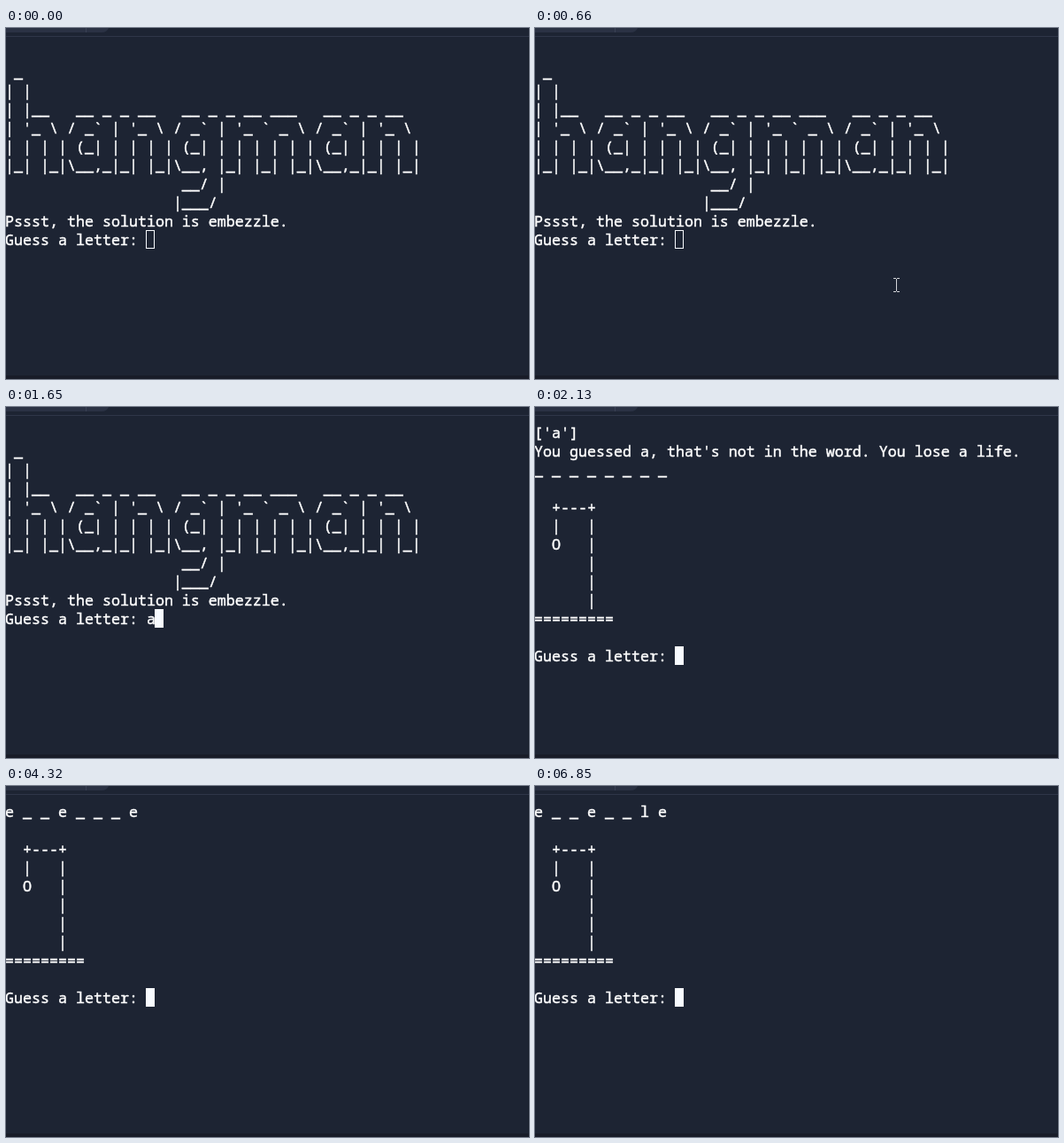
An HTML page that plays this animation: 591 px wide and 396 px high, repeating every 7.99 s.

```html
<!DOCTYPE html>
<html lang="en">
<head>
<meta charset="utf-8">
<title>Hangman terminal</title>
<style>
  html, body { margin: 0; width: 100%; height: 100%; overflow: hidden; background: #1d2433; }
  svg { display: block; width: 591px; height: 396px; }
  text {
    font: 16.667px "Noto Sans Mono", "DejaVu Sans Mono", monospace;
    font-variant-ligatures: none;
    white-space: pre;
    fill: #fff;
    stroke: #fff;
    stroke-width: .45px;
  }
</style>
</head>
<body>
<svg viewBox="0 0 591 396">
  <rect width="591" height="396" fill="#1d2433"/>
  <path d="M0 0H116Q114 5 108 5H0Z" fill="#2b3244"/>
  <path d="M90.5 0V5" stroke="#3a4155"/>
  <path d="M0 9.5H591" stroke="#2f3648"/>
  <path d="M590.5 10V392" stroke="#191f2c"/>
  <rect y="392" width="591" height="4" fill="#181c28"/>
  <g id="lines"></g>
  <rect id="caret" stroke="#f8fbff" width="9" height="20"/>
  <path id="mouse" d="M-3 -7.5H0M1 -7.5H4M-3 7.5H0M1 7.5H4M.5 -7V7" fill="none" stroke="#d4d6da"/>
</svg>
<script>
const LOOP = 7990, COL = 10, ROW = 21, LEFT = -2, TOP = 18, BASE = 17;
const $ = id => document.getElementById(id);
const PROMPT = "Guess a letter: ";

const title = String.raw`
 _
| |
| |__   __ _ _ __   __ _ _ __ ___   __ _ _ __
| '_ \ / _${"`"} | '_ \ / _${"`"} | '_ ${"`"} _ \ / _${"`"} | '_ \
| | | | (_| | | | | (_| | | | | | | (_| | | | |
|_| |_|\__,_|_| |_|\__, |_| |_| |_|\__,_|_| |_|
                    __/ |
                   |___/
Pssst, the solution is embezzle.`.split("\n");

const gallows = ["", "  +---+", "  |   |", "  O   |", "      |", "      |", "      |", "=========", ""];
const miss = ["['a']", "You guessed a, that's not in the word. You lose a life.", "_ _ _ _ _ _ _ _", ...gallows];

// start time, lines above the prompt, typed letter
const states = [
  [0, title, ""],
  [1650, title, "a"],
  [2130, miss, ""],
  [3650, miss, "e"],
  [4320, ["e _ _ e _ _ _ e", ...gallows], ""],
  [6580, ["e _ _ e _ _ _ e", ...gallows], "l"],
  [6850, ["e _ _ e _ _ l e", ...gallows], ""]
];

const rows = Array.from({ length: 13 }, (_, i) => {
  const el = document.createElementNS("http://www.w3.org/2000/svg", "text");
  el.setAttribute("x", LEFT + 1);
  el.setAttribute("y", TOP + i * ROW + BASE);
  return $("lines").appendChild(el);
});

const enter = [[490, 371], [504, 355], [553, 340], [512, 288], [429, 282], [408, 290]];
const leave = [[408, 290], [448, 336], [511, 350]];

// Smooth curve through the points, u from 0 to 1.
function along(points, u) {
  const n = points.length - 1;
  const i = Math.min(n - 1, Math.floor(u * n));
  const f = u * n - i;
  const at = k => points[Math.max(0, Math.min(n, k))];
  const [a, b, c, d] = [-1, 0, 1, 2].map(k => at(i + k));
  return b.map((p, j) => p + f / 2 * (c[j] - a[j]
    + f * (2 * a[j] - 5 * p + 4 * c[j] - d[j]
    + f * (3 * (p - c[j]) + d[j] - a[j]))));
}

// The pointer sweeps in, rests, then leaves, in discrete steps.
function pointer(t) {
  if (t < 120 || t >= 1120) return null;
  if (t < 800) return along(enter, Math.min(1, Math.floor((t - 120) / 67.5) / 8));
  return along(leave, Math.floor((t - 800) / 64) / 4);
}

function setText(el, s) {
  if (el.textContent !== s) el.textContent = s;
}

function draw(t) {
  const [, above, typed] = states.findLast(s => t >= s[0]);
  const last = above.length;
  rows.forEach((el, i) => setText(el, i === last ? PROMPT + typed : above[i] || ""));

  const caret = $("caret");
  caret.setAttribute("x", LEFT + (PROMPT + typed).length * COL + 0.5);
  caret.setAttribute("y", TOP + last * ROW + 0.5);
  caret.setAttribute("fill", t < 800 ? "none" : "#f8fbff");

  const p = pointer(t);
  $("mouse").style.display = p ? "" : "none";
  if (p) $("mouse").setAttribute("transform", `translate(${p.map(Math.round)})`);
}

function tick() {
  draw(performance.now() % LOOP);
  requestAnimationFrame(tick);
}
tick();
</script>
</body>
</html>
```
